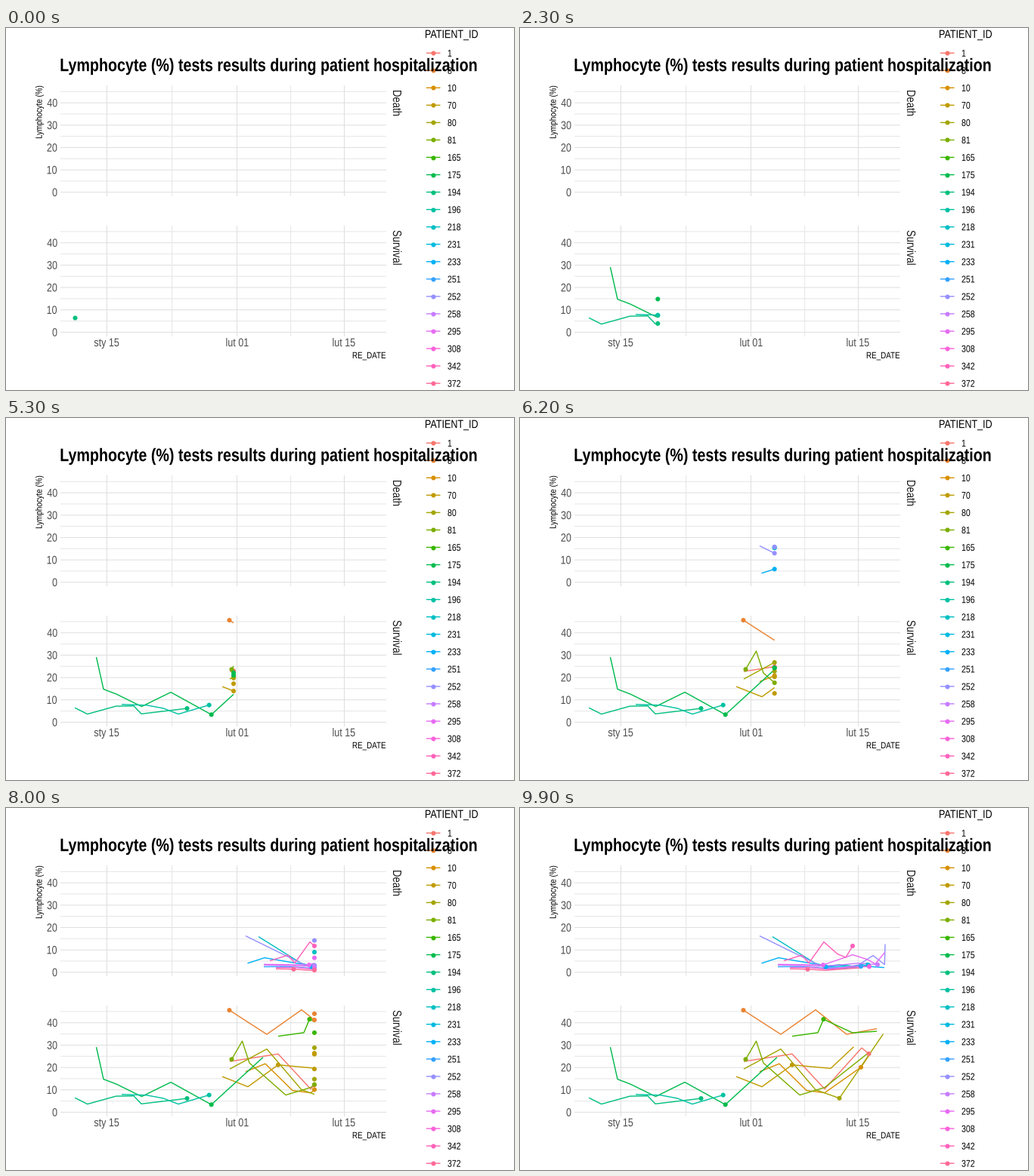
These frames come from a looping animation (672x480 px, 10000 ms). A matplotlib script:

```python
import numpy as np
import matplotlib.pyplot as plt
from matplotlib.animation import FuncAnimation
from matplotlib.patches import PathPatch
from matplotlib.textpath import TextPath
from matplotlib.transforms import Affine2D

W, H, DPI = 672, 480, 100
FRAMES, INTERVAL = 100, 100
PX = 72 / DPI           # points per pixel
NARROW = 0.82           # width ratio of the narrow sans face
LINE, DOT = 1.42 * PX, (6.1 * PX) ** 2
X_START, X_END = 91.2, 483.2
rng = np.random.default_rng(4)

IDS = [1, 8, 10, 70, 80, 81, 165, 175, 194, 196,
       218, 231, 233, 251, 252, 258, 295, 308, 342, 372]
HUES = ("F8766D EA8331 D89000 C09B00 A3A500 7CAE00 39B600 00BB4E 00BF7D 00C1A3 "
        "00BFC4 00BAE0 00B0F6 35A2FF 9590FF C77CFF E76BF3 FA62DB FF62BC FF6A98").split()
COLOR = {i: "#" + h for i, h in zip(IDS, HUES)}

fig = plt.figure(figsize=(W / DPI, H / DPI), dpi=DPI, facecolor="white")
ax = fig.add_axes([0, 0, 1, 1])
ax.set(xlim=(0, W), ylim=(H, 0))
ax.axis("off")


def label(x, y, s, size, align=0, rot=0, color="black", weight="normal"):
    """Narrow text; align 0 = start, 0.5 = centre, 1 = end at (x, y) on the baseline."""
    path = TextPath((0, 0), s, size=size,
                    prop={"family": "Liberation Sans", "weight": weight})
    box = path.get_extents()
    t = Affine2D().translate(-align * (box.x0 + box.x1), 0)
    t = t.scale(NARROW, -1).rotate_deg(rot).translate(x, y)
    ax.add_patch(PathPatch(t.transform_path(path), fc=color, lw=0, zorder=6))


def segment(xs, ys, color, width, z):
    return ax.plot(xs, ys, color=color, lw=width, zorder=z, snap=False,
                   solid_capstyle="butt", solid_joinstyle="round")[0]


def panel(top, zero, name):
    shades = ("#dedede", "#e6e6e6")
    for i in range(10):
        y = zero - i * 14.83
        segment([72, 503], [y, y], shades[i % 2], PX, 1)
        if i % 2 == 0:
            label(68, y + 5.3, str(i * 5), 15.3, 1, color="#4d4d4d")
    for x, shade in ((133.5, 0), (219.6, 1), (305.5, 0), (376.6, 1), (447.5, 0)):
        segment([x, x], [top, top + 147], shades[shade], PX, 1)
    label(512, top + 6, name, 16, rot=90, color="#1a1a1a")


panel(76, 217.8, "Death")
panel(262, 403.4, "Survival")
for x, s in ((133, "sty 15"), (306, "lut 01"), (447, "lut 15")):
    label(x, 422.1, s, 15.3, 0.5, color="#4d4d4d")
label(503, 438, "RE_DATE", 12, 1)
label(47.5, 76, "Lymphocyte (%)", 12, 1, rot=-90)

label(554, 13.2, "PATIENT_ID", 15.3)
for i, pid in enumerate(IDS):
    y = 33.2 + 23.05 * i
    segment([556, 574.5], [y, y], COLOR[pid], LINE, 5)
    ax.scatter(565.2, y, s=DOT, c=COLOR[pid], lw=0, zorder=5)
    label(584, y + 4.6, str(pid), 12.9)
label(71.2, 57.2, "Lymphocyte (%) tests results during patient hospitalization",
      24, weight="bold")

lines, dots = [], []


def patient(pid, pts, hold=None, skip=()):
    """A polyline of readings with its markers.

    The held reading keeps its marker, another marker walks over the rest,
    and one more runs straight from each skip reading to the last.
    """
    pts = np.array(pts, float) - (0, 0.4)
    color = COLOR[pid]
    lines.append((pts, segment([], [], color, LINE, 3)))
    walk = pts if hold in (None, -1) else np.delete(pts, hold, axis=0)
    dots.append((walk, False, color))
    dots.extend((pts[[a, -1]], False, color) for a in skip)
    if hold is not None:
        dots.append((pts[[hold]], True, color))


def low(x0, x1, n, level=210):
    """Readings that wander near the bottom of the Death panel."""
    return list(zip(np.linspace(x0, x1, n), level + rng.uniform(-2.5, 2.5, n)))


# Survival
patient(1, [(296, 336.5), (360, 326.5), (403, 373), (452, 318.5), (461.5, 326.3)], -1)
patient(8, [(295.5, 268.5), (345, 300.5), (391, 268), (432, 300.5), (472, 293)], 0, [2])
patient(10, [(317, 350), (343, 339.5), (379, 375), (403, 378), (451, 344.2), (462, 328)], 4)
patient(70, [(286, 356.5), (320, 370), (360, 341), (411, 345.7), (441.5, 317)], 2, [0, 2])
patient(80, [(296, 346.5), (345, 320), (391, 374), (422.5, 385.2), (480.5, 300)], 3, [0])
patient(81, [(298.5, 333.7), (312.5, 309.5), (322, 338.5), (370, 381), (403, 371),
             (461, 325)], 0)
patient(165, [(360, 303), (394, 298.3), (401.5, 280.5), (440, 298.5), (472, 296.5)], 2)
patient(175, [(119.5, 317.5), (129, 360), (146, 366.5), (179.5, 383), (218, 364),
              (271.7, 393.7), (340, 331)], 5, [2])
patient(194, [(91.2, 384.7), (107.7, 393), (145.5, 382.5), (169, 382.2), (179, 392.7),
              (239.5, 385.5)], -1)
patient(196, [(153, 380.2), (186, 381.2), (208, 385.3), (228, 393), (268.7, 381)], -1)

# Death
patient(218, [(334, 171), (390, 206)] + low(405, 460, 4, 208), skip=[0])
patient(231, low(401, 460.5, 4), -1)
patient(233, [(319.5, 206.3), (342, 199), (389, 207), (404.5, 211)] + low(432, 482, 3), 3)
patient(251, low(341, 451, 5, 211), -1)
patient(252, [(317, 170), (390, 206)] + low(405, 448, 3)
        + [(467, 196), (482.3, 208), (483, 181)], skip=[0])
patient(258, low(341, 473, 6, 208), -1)
patient(295, [(341, 207.7), (401, 208.5), (440, 195), (459, 201), (470, 207), (482.5, 192)], 1)
patient(308, low(357, 462, 5, 212), -1)
patient(342, [(349, 203), (373, 195.5), (382, 206), (402, 178), (420, 194), (431, 198.5),
              (440, 183.3)], -1)
patient(372, low(357, 451, 5, 213.5), 1)

marks = ax.scatter([], [], s=DOT, lw=0, zorder=4)


def draw(k):
    x = X_START + (X_END - X_START) * k / (FRAMES - 1)
    for pts, line in lines:
        px, py = pts.T
        if x < px[0]:
            line.set_data([], [])
            continue
        seen = px <= x
        tip = min(x, px[-1])
        line.set_data(np.append(px[seen], tip),
                      np.append(py[seen], np.interp(tip, px, py)))
    spots, colors = [], []
    for route, stays, color in dots:
        px, py = route.T
        if x >= px[0] and (stays or x < px[-1]):
            tip = min(x, px[-1])
            spots.append((tip, np.interp(tip, px, py)))
            colors.append(color)
    marks.set_offsets(spots)
    marks.set_facecolors(colors)
    return [line for _, line in lines] + [marks]


anim = FuncAnimation(fig, draw, frames=FRAMES, interval=INTERVAL,
                     repeat=True, repeat_delay=0)
plt.show()
```
